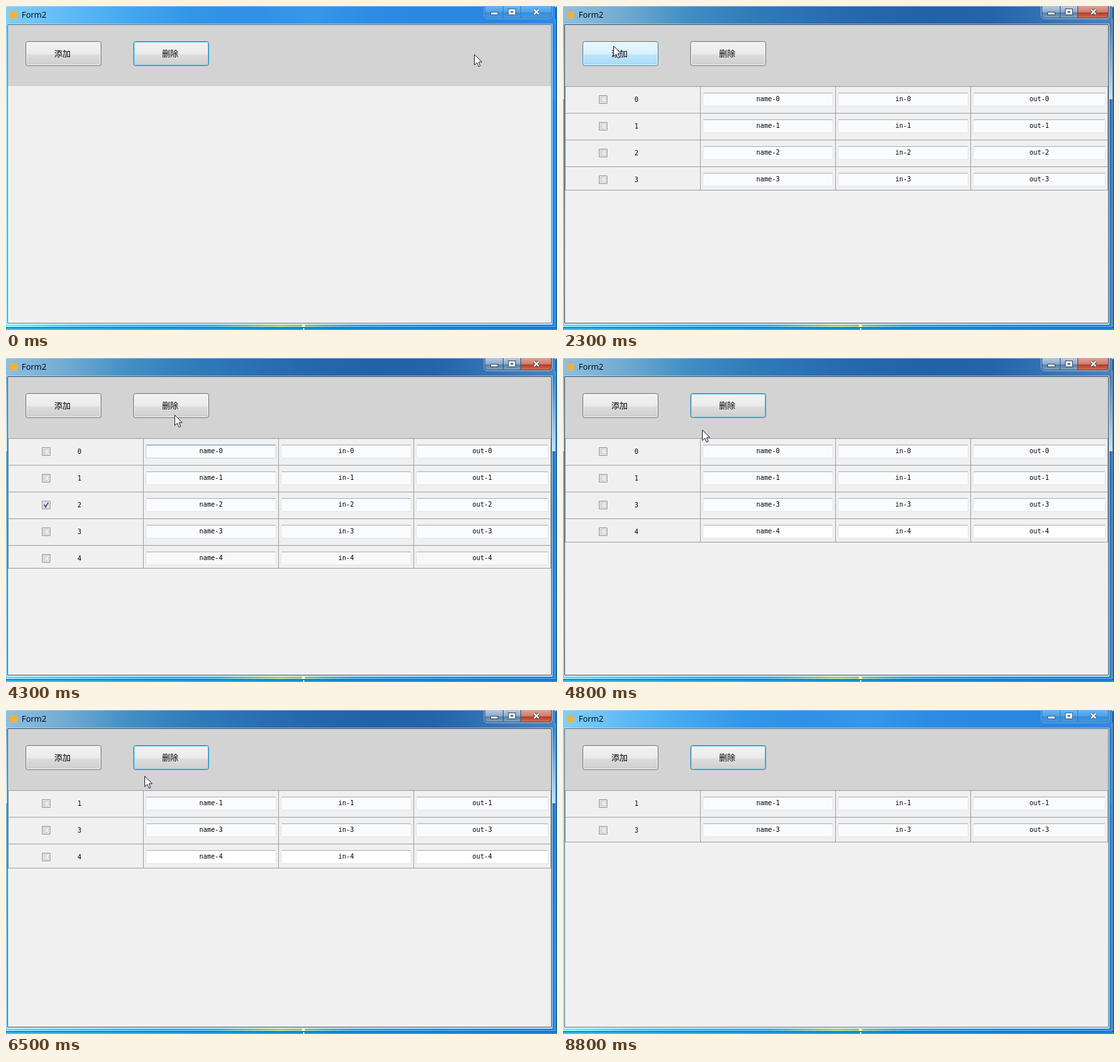
An HTML page with a canvas for the animation above (8900 ms loop, 844 px wide and 497 px high).

```html
<!DOCTYPE html>
<html lang="zh">
<head>
<meta charset="utf-8">
<title>Form2</title>
<style>
html, body { margin: 0; width: 100%; height: 100%; overflow: hidden; }
canvas { display: block; }
</style>
</head>
<body>
<canvas id="stage" width="844" height="497"></canvas>
<script>
const ctx = document.getElementById('stage').getContext('2d');
const LOOP = 8900, STEP = 100, ACTIVATE = 900, DEACTIVATE = 8800;
const TOP = 123, PITCH = 41;
const MONO = '10px "DejaVu Sans Mono", monospace';

// When each row is added, ticked and removed; `exit` is where the pointer goes after ticking
const rows = [
  { add: 1000, tick: 5500, del: 6400, exit: [241, 94] },
  { add: 1400 },
  { add: 1900, tick: 4000, del: 4700, exit: [258, 87] },
  { add: 2300 },
  { add: 2700, tick: 6900, del: 7800, exit: [248, 70] },
].map((row, id) => ({ ...row, id }));
const removed = rows.filter(r => r.del);

const visibleRows = t => rows.filter(r => t >= r.add && !(t >= r.del));
const lerp = (a, b, k) => a + (b - a) * k;
const column = i => i < 4 ? 3 + 207 * i : 834;

// Pointer keys: free moves, plus one trip from tick box to delete button per removed row
const keys = [
  [0, 717, 74], [900, 68, 63], [2300, 77, 61], [2700, 77, 61],
  [3200, 93, 223], [3600, 88, 235], [3800, 88, 235], [5200, 68, 268],
  [8400, 850, 150], [LOOP, 850, 150],
  ...removed.flatMap(row => {
    const boxY = TOP + 21 + PITCH * visibleRows(row.tick).indexOf(row);
    const [x, y] = row.exit;
    return [
      [row.tick, 62, boxY],
      [row.tick + 200, 225, lerp(y, boxY, .4)],
      [row.tick + 300, x, y],
      [row.del - 200, 247, 66],
      [row.del, 249, 70],
    ];
  }),
].sort((a, b) => a[0] - b[0]);

function pointer(t) {
  const i = Math.max(1, keys.findIndex(key => key[0] >= t));
  const [t0, x0, y0] = keys[i - 1], [t1, x1, y1] = keys[i];
  const k = (Math.max(t, 0) - t0) / (t1 - t0);
  return [Math.round(lerp(x0, x1, k)), Math.round(lerp(y0, y1, k))];
}

function over(t, x, y, w, h) {
  const [px, py] = pointer(t);
  return px >= x && px < x + w && py >= y && py < y + h;
}

// Evenly spaced colours, left to right or top to bottom
function blend(colors, x, y, w, h, vertical) {
  const g = vertical ? ctx.createLinearGradient(0, y, 0, y + h) : ctx.createLinearGradient(x, 0, x + w, 0);
  colors.forEach((color, i) => g.addColorStop(i / (colors.length - 1), color));
  fill(g, x, y, w, h);
}

function fill(color, x, y, w, h) {
  ctx.fillStyle = color;
  ctx.fillRect(x, y, w, h);
}

function outline(color, x, y, w, h, r = 0) {
  ctx.strokeStyle = color;
  ctx.lineWidth = 1;
  ctx.beginPath();
  ctx.roundRect(x + .5, y + .5, w - 1, h - 1, r);
  ctx.stroke();
}

function text(str, x, y, font, align = 'center') {
  ctx.font = font;
  ctx.textAlign = align;
  ctx.fillStyle = '#000';
  ctx.fillText(str, x, y);
}

function gloss([a, b, c, d], x, y, w, h) {
  const half = Math.ceil((h + 1) / 2);
  blend([a, b], x, y, w, half, true);
  blend([c, d], x, y + half, w, h - half, true);
}

function drawGlass(active) {
  blend(active
    ? ['#8dc0e0', '#70aad2', '#438fc4', '#327cba', '#2a70b5', '#2467ad', '#2362a9', '#2563aa', '#3574b6', '#4a85c0']
    : ['#7fd0fa', '#5ebaf6', '#43a8f0', '#3296e9', '#3090e7', '#3697ea', '#2d8be4', '#2b88e3', '#2a86e1', '#2f8ae2'], 0, 0, 842, 28);
  fill('rgba(220,240,255,.5)', 0, 0, 842, 1);

  // Sides: a pale reflection ends at y = 143
  blend(active ? ['#5b9fc9', '#c2e0f0'] : ['#69c4f8', '#7dd8fa'], 0, 28, 2, 115, true);
  blend(active ? ['#3c9bd6', '#6bd4f6'] : ['#7ddbfb', '#86f0fb'], 0, 143, 2, 350, true);
  blend(active ? ['#3f7ebc', '#c8dff0'] : ['#2a82dc', '#2f8be2'], 837, 28, 5, 115, true);
  blend(active ? ['#2b75bd', '#3387cf'] : ['#2a84de', '#2583df'], 837, 143, 5, 350, true);

  blend([active ? '#7dd4f2' : '#80eef8', '#5cc2f0', '#48b0e8', '#4aa8dc', '#b3cc70', '#4aa0cc', '#3592da', '#2d88d6', '#2d84d4'], 0, 488, 842, 5);
  fill('rgba(200,236,255,.55)', 841, 20, 1, 473);
  fill('rgba(200,236,255,.55)', 0, 492, 842, 1);
  fill('#12324f', 0, 493, 843, 1);
  fill('#12324f', 842, 2, 1, 491);
  blend(['#35c4fa', '#18a4f4', '#1a8cec'], 0, 494, 844, 3);
  fill('#1e90ee', 843, 0, 1, 497);
  fill('#fff7a0', 453, 489, 5, 3);
  fill('#fffbd0', 455, 494, 2, 3);
}

function drawCaption(active) {
  fill('#efb23a', 6, 8, 11, 11);
  text('Form2', 24, 18, '12.5px "Open Sans", sans-serif', 'left');
  const blue = active ? ['#b4cce2', '#86a8cb', '#4f7cab', '#7aa3c8']
    : ['#6db4ee', '#4b9fe7', '#318bdd', '#439ae5'];
  const red = active ? ['#dfa398', '#cf7767', '#b23625', '#d0714c'] : blue;
  gloss(blue, 734, 0, 55, 18);
  gloss(red, 789, 0, 46, 18);
  outline(active ? 'rgba(235,245,255,.65)' : 'rgba(200,230,255,.45)', 732, -6, 105, 26, 5);
  outline(active ? '#33475c' : '#3a70a5', 733, -6, 103, 25, 4);
  [761, 788].forEach(x => fill(active ? '#3a526c' : '#3f79b0', x, 0, 1, 18));

  const dark = active ? '#3b4759' : '#39668f';
  fill(dark, 742, 9, 12, 5);
  fill('#fff', 743, 10, 10, 3);
  fill(dark, 769, 4, 12, 10);
  fill('#fff', 770, 5, 10, 8);
  fill(dark, 773, 8, 4, 2);
  ctx.beginPath();
  [[5.5, 12.5], [12.5, 5.5]].forEach(([from, to]) => {
    ctx.moveTo(809, from);
    ctx.lineTo(816, to);
  });
  [[dark, 4.5], ['#fff', 2.3]].forEach(([color, width]) => {
    ctx.strokeStyle = color;
    ctx.lineWidth = width;
    ctx.stroke();
  });
}

function drawButton(t, label, x, clicks, focused) {
  const y = 54, w = 116, h = 38;
  const pressed = clicks.some(click => t >= click - STEP && t < click);
  const hover = over(t, x, y, w, h) && over(t - STEP, x, y, w, h);
  const face = pressed ? ['#e5f4fc', '#c4e5f6', '#98d1ef', '#68b3db']
    : hover ? ['#eaf6fd', '#d9f0fc', '#bee6fd', '#a7d9f5']
    : ['#f2f2f2', '#ebebeb', '#dddddd', '#cfcfcf'];
  gloss(face, x + 1, y + 1, w - 2, h - 2);
  outline(pressed ? '#6f9fbd' : focused ? '#52d2f4' : '#fafafa', x + 1, y + 1, w - 2, h - 2, 2);
  outline(pressed ? '#2c628b' : hover || focused ? '#3c7fb1' : '#707070', x, y, w, h, 3);
  text(label, x + 56.5, 78, '12.5px "Noto Sans CJK SC", "Noto Sans CJK", sans-serif');
}

function drawCheckbox(x, y, checked, hot) {
  fill('#f4f4f4', x, y, 13, 13);
  outline(hot ? '#3c7fb1' : '#8e8f8f', x, y, 13, 13);
  blend([hot ? '#b1dff8' : '#d4d7dc', '#f6f6f6'], x + 2, y + 2, 9, 9);
  outline(hot ? '#79c6f9' : '#c4c8ce', x + 2, y + 2, 9, 9);
  if (!checked) return;
  ctx.strokeStyle = '#4b5f97';
  ctx.lineWidth = 2;
  ctx.beginPath();
  ctx.moveTo(x + 3.5, y + 6);
  ctx.lineTo(x + 5.7, y + 9.5);
  ctx.lineTo(x + 9.7, y + 2.8);
  ctx.stroke();
}

function drawField(t, label, x, y, w, color) {
  const hot = over(t, x, y, w, 21) || over(t - STEP, x, y, w, 21);
  fill(color, x, y, w, 21);
  outline(hot ? '#b7d5ea' : '#e2e3ea', x, y, w, 21, 1);
  fill(hot ? '#5794bf' : '#abadb3', x + 1, y, w - 2, 1);
  text(label, x + w / 2, y + 13, MONO);
}

function drawTable(t) {
  const shown = visibleRows(t);
  if (!shown.length) return;
  const line = '#a0a0a0', height = 40 * shown.length;
  for (let i = 0; i < 5; i++) fill(line, column(i), TOP, 1, height);
  fill(line, 3, TOP + height - 1, 832, 1);
  shown.forEach(({ id, tick }, i) => {
    const y = TOP + PITCH * i;
    fill(line, 3, y, 832, 1);
    drawCheckbox(55, y + 14, t >= tick, over(t, 55, y + 14, 50, 13));
    text(id, 112.5, y + 24, MONO);
    const color = id < 4 ? '#f8fcff' : t < removed[1].del ? '#f8f8f8' : '#fff';
    ['name', 'in', 'out'].forEach((name, n) => {
      const x = column(n + 1);
      drawField(t, name + '-' + id, x + 4, y + 10, column(n + 2) - x - 7, color);
    });
  });
}

function drawPointer(x, y) {
  const shape = [[0, 0], [0, 16], [4, 12.5], [6.5, 18.5], [9, 17.5], [6.5, 11.5], [11.5, 11.5]];
  ctx.beginPath();
  shape.forEach(([dx, dy]) => ctx.lineTo(x + .5 + dx, y + .5 + dy));
  ctx.closePath();
  ctx.fillStyle = '#fff';
  ctx.fill();
  ctx.strokeStyle = '#1c2238';
  ctx.lineWidth = 1;
  ctx.stroke();
}

function draw(now) {
  const t = Math.floor(now % LOOP / STEP) * STEP;
  const active = t >= ACTIVATE && t < DEACTIVATE;
  const ticked = removed.some(r => t >= r.tick && t < r.del);
  const deleteFocused = t < ACTIVATE || removed.some(r => t >= r.del) && !ticked;
  drawGlass(active);
  drawCaption(active);
  outline('rgba(205,235,252,.65)', 1, 27, 836, 462);
  fill('#f0f0f0', 2, 28, 834, 459);
  fill('#d3d3d3', 3, 29, 832, 94);
  outline(active ? '#2c4a66' : '#4b7391', 2, 28, 834, 459);
  drawButton(t, '添加', 30, rows.map(r => r.add), false);
  drawButton(t, '删除', 195, removed.map(r => r.del), deleteFocused);
  drawTable(t);
  drawPointer(...pointer(t));
  requestAnimationFrame(draw);
}
requestAnimationFrame(draw);
</script>
</body>
</html>
```
